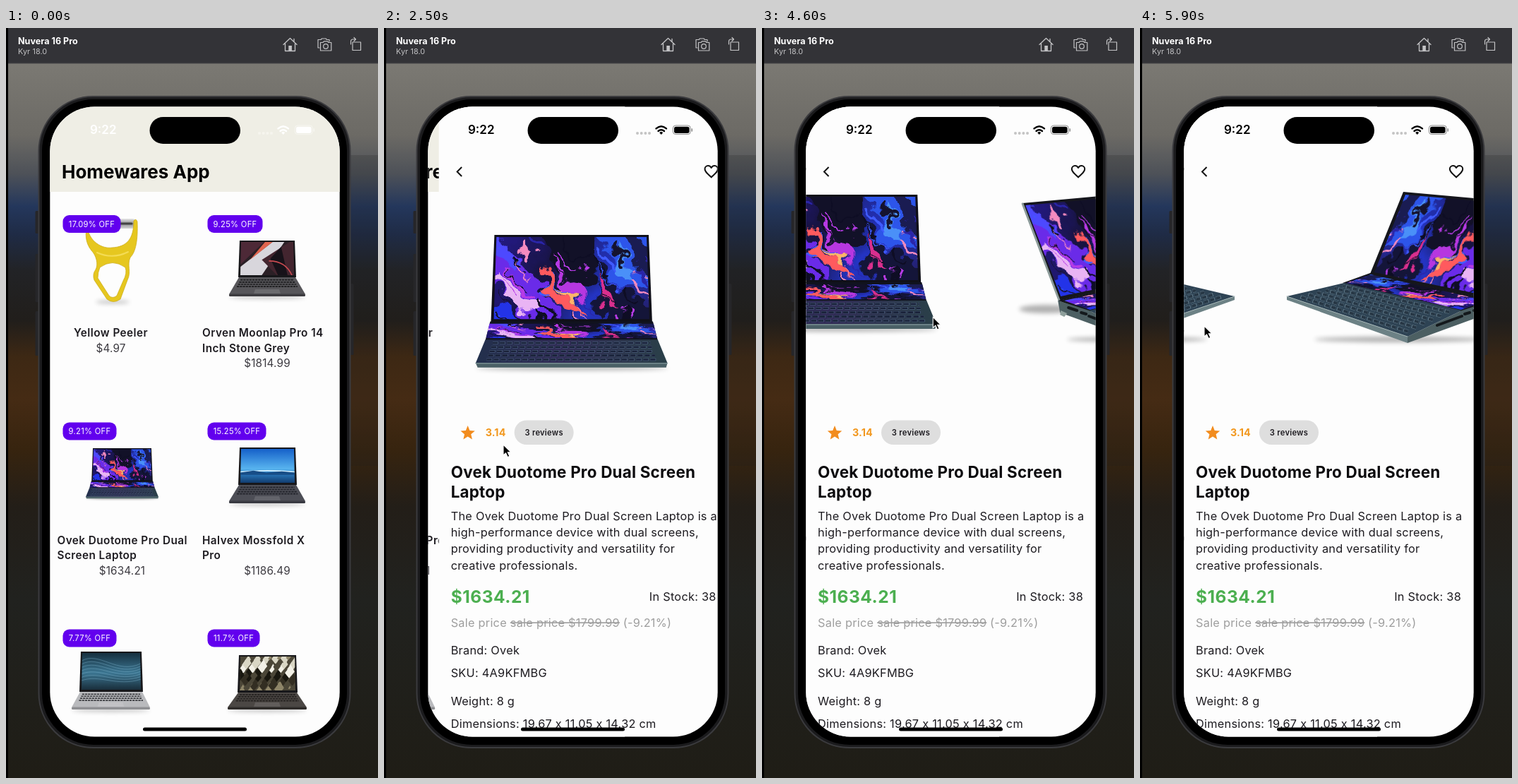
Animation of 527 by 1062 pixels, one loop 6000 ms. Source, as an HTML page:

```html
<!DOCTYPE html>
<html lang="en">
<head>
<meta charset="utf-8">
<title>Shop demo</title>
<style>
html, body { margin: 0; width: 100%; height: 100%; overflow: hidden; background: #000; }
svg { display: block; width: 527px; height: 1062px; }
text { font-family: Inter, Roboto, sans-serif; white-space: pre; }
</style>
</head>
<body>
<svg id="stage" viewBox="0 0 527 1062"></svg>
<script>
const LOOP = 6000, STEP = 100;
const INK = '#1d1b20', PAPER = '#fdfdfd';
let clipCount = 0;

// ---- markup helpers ----
const text = (x, y, str, size, { w = 400, fill = INK, ls = 0, anchor = 'start' } = {}) =>
  `<text x="${x}" y="${y}" font-size="${size}" font-weight="${w}" fill="${fill}" letter-spacing="${ls}" text-anchor="${anchor}">${str}</text>`;
const rect = (x, y, w, h, r, fill, extra = '') =>
  `<rect x="${x}" y="${y}" width="${w}" height="${h}" rx="${r}" fill="${fill}" ${extra}/>`;
const poly = (points, fill, extra = '') => `<polygon points="${points}" fill="${fill}" ${extra}/>`;
const line = (d, color, width, extra = '') =>
  `<path d="${d}" fill="none" stroke="${color}" stroke-width="${width}" stroke-linecap="round" stroke-linejoin="round" ${extra}/>`;
const shade = (cx, cy, rx, ry) => `<ellipse cx="${cx}" cy="${cy}" rx="${rx}" ry="${ry}" fill="#000" opacity=".3" filter="url(#soft)"/>`;
const gradient = (id, stops, dir = 'x2="0" y2="1"') => `<linearGradient id="${id}" ${dir}>` +
  stops.map(([at, color]) => `<stop offset="${at}" stop-color="${color}"/>`).join('') + '</linearGradient>';

// Places a 100 x 56 wallpaper on a screen polygon.
function screen(points, matrix, art) {
  const id = 'clip' + clipCount++;
  return `<clipPath id="${id}"><polygon points="${points}"/></clipPath>
    <g clip-path="url(#${id})"><g transform="matrix(${matrix})">${art}</g></g>`;
}

// Dashed rows between the back edge a-b and the front edge d-c of a deck.
function keys([a, b, c, d], rows, color, width, dash, from = .12, to = .88) {
  const mix = (p, q, k) => p.map((v, i) => v + (q[i] - v) * k);
  let out = '';
  for (let i = 0; i < rows; i++) {
    const k = from + (to - from) * i / (rows - 1);
    const l = mix(a, d, k), r = mix(b, c, k);
    out += `<path d="M${mix(l, r, .05)}L${mix(l, r, .95)}" stroke="${color}" stroke-width="${width}" stroke-dasharray="${dash}"/>`;
  }
  return out;
}

// ---- wallpapers ----
const blobs = [
  ['M18,-8C40,2 30,22 46,30S70,20 62,-8Z', '#121128'],
  ['M-8,8C10,4 22,18 30,32S44,44 40,66L20,66C26,48 10,40 -8,34Z', '#6a2be8'],
  ['M-6,24C8,26 12,36 22,40S32,46 31,50C22,50 12,46 6,40Z', '#e9b4f4'],
  ['M2,-4C12,4 8,12 20,18L14,24C6,18 2,10 -6,8Z', '#4d49ff'],
  ['M62,-6C66,8 82,10 76,24S92,36 108,30L108,-6Z', '#2d55ea'],
  ['M66,18C76,22 70,34 84,38S98,50 106,48L106,62L70,62C76,48 62,40 66,18Z', '#141539'],
  ['M84,-6C82,8 96,12 92,24L108,30L108,10Z', '#1a1c52'],
  ['M76,2C80,14 92,12 90,24S80,26 79,18Z', '#4a90f8'],
  ['M32,20C38,30 36,36 46,41S56,50 66,52C54,56 46,50 40,44S30,32 32,20Z', '#ff5a5e'],
  ['M38,12C46,18 44,28 54,31S58,42 64,44C52,44 46,38 42,30Z', '#b637e0'],
  ['M36,27C40,34 48,34 52,44C46,42 38,36 36,27Z', '#ffb46a'],
  ['M66,22C72,30 70,38 78,46C68,42 63,34 66,22Z', '#d92f8e'],
  ['M-6,46C8,46 16,52 30,60L-6,62Z', '#2333e8']
].map(([d, fill]) => `<path d="${d}" fill="${fill}"/>`).join('');
const inks = ['#0e0d24', '#3f5bff', '#15132f', '#b63be6', '#0e0d24', '#f58bc0', '#2a25a8'];
const streaks = Array.from({ length: 42 }, (_, i) => {
  const x = (i * 41) % 108 - 6, y = (i * 29) % 60 - 4, run = 5 + (i * 7) % 11;
  return line(`M${x},${y}q${run * .2},${run * .8} ${run},${run}`, inks[i % inks.length], .7 + (i % 4) * .6);
}).join('');
const fluid = `<g filter="url(#marble)">${rect(-20, -20, 150, 100, 0, 'url(#fluid)')}${blobs}${streaks}</g>`;

const shards = rect(0, 0, 100, 60, 0, '#2b2026') +
  poly('0,56 0,42 60,0 82,0 40,56', '#d8d6dc') + poly('0,0 44,0 0,38', '#4d2937') +
  poly('46,0 60,0 18,30', '#e0644e') + poly('68,56 40,30 92,0 100,0 100,56', '#43252f') +
  poly('56,28 76,8 88,56 70,56', '#171219') + line('M54,32Q84,32 96,56', '#c84a50', 2);
const horizon = rect(0, 0, 100, 60, 0, 'url(#sky)') +
  line('M0,38Q50,34 100,38', '#d8f2ff', 2) + poly('0,39 24,36 48,39 76,37 100,39 100,43 0,43', '#174d87');
let waves = rect(0, 0, 100, 60, 0, 'url(#teal)');
for (let i = 0; i < 7; i++) waves += line(`M0,${12 + i * 5}C30,${-4 + i * 6} 60,${34 + i * 3} 100,${16 + i * 4}`, '#83b9d2', .9, 'opacity=".5"');
let crystals = rect(0, 0, 100, 60, 0, '#4b4637');
for (let i = 0; i < 70; i++) {
  const x = (i * 37) % 101, y = (i * 23) % 57, s = 3 + (i * 7) % 9;
  crystals += poly(`${x},${y - s} ${x + s * .6},${y} ${x - s * .3},${y + s} ${x - s},${y + 2}`,
    ['#d9d6c4', '#19170f', '#8e8568', '#f2f0e6', '#332e22'][i % 5]);
}

// ---- products ----
function laptop({ x, y, w, hinge, left, right, front, art, deck, edge, key }) {
  const r = x + w, mid = (left + right) / 2, corners = [[x - 1, hinge], [r + 1, hinge], [right, front], [left, front]];
  return shade(mid, front + 4, (right - left) / 2, 2) +
    poly(`${x},${y} ${r},${y} ${r + 2},${hinge} ${x - 2},${hinge}`, '#17171a') +
    screen(`${x + 2},${y + 2} ${r - 2},${y + 2} ${r - 1},${hinge - 3} ${x + 1},${hinge - 3}`,
      [(w - 2) / 100, 0, 0, (hinge - y - 5) / 56, x + 1, y + 2], art) +
    poly(corners.join(' '), deck) + keys(corners, 4, key, 1.7, '3.2 1', .15, .55) +
    poly(`${mid - 17},${front - 7} ${mid + 17},${front - 7} ${mid + 19},${front - 1} ${mid - 19},${front - 1}`, '#fff', 'opacity=".12"') +
    rect(left, front - .5, right - left, 3.5, 1.5, edge);
}

const peeler = shade(151, 388, 24, 2) + rect(154, 270, 29, 14, 4, 'url(#steel)') +
  line('M160,277H178', '#444', 3) +
  `<path fill="#e6c71f" stroke="#c9a813" stroke-width=".7" fill-rule="evenodd" d="M115,280C117,303 137,313 150,311
   C171,310 181,299 181,273Q184,269 186,274C187,300 184,317 176,325C171,336 178,345 172,357L162,384Q152,391 143,384
   L125,357Q122,349 127,342C131,335 128,322 121,315C112,304 112,290 115,280Z
   M133,339Q151,326 169,339Q172,347 166,358L157,379Q151,384 146,379L130,354Q130,346 133,339Z"/>` +
  line('M129,318Q151,328 173,317', '#f4dc55', 2);

const dualFront = (() => {
  const deck = [[144, 386], [391, 386], [405, 420], [130, 420]];
  return shade(268, 427, 138, 3) +
    poly('157,236 378,236 383,361 152,361', '#101018') +
    screen('160,239 375,239 379,357 156,357', [2.23, 0, 0, 2.11, 156, 239], fluid) +
    poly('151,360 384,360 391,387 144,387', '#11131f') +
    screen('150,363 385,363 390,384 145,384', [2.47, 0, 0, .6, 144, 355], fluid) +
    poly(deck.join(' '), 'url(#dualDeck)') + keys(deck, 5, '#53698a', 3.4, '8 2.2', .14, .84) +
    keys(deck, 5, '#1a2239', 2.6, '7.4 2.8', .14, .84) +
    poly('130,419 405,419 403,426 133,426', '#4a6066') + line('M130,420H405', '#8ea3a6', 1);
})();

const dualSide = (() => {
  const deck = [[211, 400], [378, 361], [459, 380], [288, 437]];
  return shade(300, 441, 120, 4) + shade(150, 398, 38, 6) +
    poly('117,248 294,232 341,348 169,386', '#15161c') + line('M117,249L169,386', '#8b9a99', 3) +
    screen('121,251 291,236 335,346 171,380', [1.71, -.2, .86, 2.25, 121, 250], fluid) +
    poly('167,386 341,347 380,361 211,402', '#15161c') +
    screen('176,386 340,349 375,361 212,399', [1.7, -.36, .7, .32, 170, 383], fluid) +
    poly('167,386 211,400 288,437 288,446 170,403', '#4c5f62') +
    poly('288,437 459,380 459,385 288,446', '#6c8185') +
    poly(deck.join(' '), '#2e4354') + keys(deck, 6, '#637b8a', 5, '7 2') + keys(deck, 6, '#273745', 4, '6 3') +
    line('M182,396L194,400M200,403L207,405M211,408L246,421', '#14191c', 4) +
    poly('171,400 180,404 176,409 170,406', '#8fa09c') + line('M288,437L459,380', '#a5b5b5', 1);
})();

const products = peeler +
  laptop({ x: 331, y: 301, w: 78, hinge: 353, left: 316, right: 424, front: 377, art: shards, deck: '#57565a', edge: '#3d3c40', key: '#1c1c1e' }) +
  laptop({ x: 331, y: 594, w: 79, hinge: 647, left: 316, right: 424, front: 670, art: horizon, deck: '#4d4e56', edge: '#383941', key: '#22232a' }) +
  laptop({ x: 106, y: 883, w: 86, hinge: 940, left: 93, right: 204, front: 962, art: waves, deck: '#b9babd', edge: '#8f9093', key: '#3b3c40' }) +
  laptop({ x: 330, y: 888, w: 81, hinge: 941, left: 314, right: 426, front: 962, art: crystals, deck: '#4b4744', edge: '#2f2c2a', key: '#24211f' });

// ---- pages ----
const badge = (x, y, w, label) => rect(x, y, w, 25, 9, '#6200ee') +
  text(x + w / 2, y + 16.7, label, 11.2, { fill: '#fff', ls: .3, anchor: 'middle' });
const name = (x, y, str) => text(x, y, str, 15.3, { w: 600, ls: .45 });
const cost = (x, y, str) => text(x, y, str, 15.3, { fill: '#3c3a40', ls: .15, anchor: 'middle' });

const listPage = rect(62, 111, 411, 894, 0, PAPER) + rect(62, 111, 411, 121, 0, '#efeee5') +
  text(79, 213, 'Homewares App', 26, { w: 700, fill: '#000' }) + products +
  badge(80.5, 265, 82, '17.09% OFF') + badge(285.5, 265, 78, '9.25% OFF') +
  badge(80.5, 558.5, 76, '9.21% OFF') + badge(285.5, 558.5, 83, '15.25% OFF') +
  badge(80.5, 851.5, 76, '7.77% OFF') + badge(285.5, 851.5, 74, '11.7% OFF') +
  name(96, 437, 'Yellow Peeler') + cost(148.5, 458.5, '$4.97') +
  name(278, 437, 'Orven Moonlap Pro 14') + name(278, 458.5, 'Inch Stone Grey') + cost(370, 480, '$1814.99') +
  name(72.5, 730.5, 'Ovek Duotome Pro Dual') + name(72.5, 752, 'Screen Laptop') + cost(164.5, 773.5, '$1634.21') +
  name(278, 730.5, 'Halvex Mossfold X') + name(278, 752, 'Pro') + cost(370, 773.5, '$1186.49');

const body = (x, y, str, fill = INK, anchor) => text(x, y, str, 16.32, { fill, ls: .255, anchor });
const star = Array.from({ length: 10 }, (_, i) => {
  const a = Math.PI * (i / 5 - .5), r = i % 2 ? 4.8 : 10.7;
  return [103 + r * Math.cos(a), 573.8 + r * Math.sin(a)].map(v => v.toFixed(1));
}).join(' ');

const detailPage = rect(62, 111, 411, 894, 0, PAPER) +
  `<path d="M94.5,197L88,203.5L94.5,210" fill="none" stroke="#111" stroke-width="2"/>` +
  line('M12,20C6,14.5 3,12 3,8.5C3,6 5,4 7.5,4C9.3,4 11,5.1 12,6.8C13,5.1 14.7,4 16.5,4C19,4 21,6 21,8.5C21,12 18,14.5 12,20Z',
    '#111', 2, 'transform="translate(435.8 191) scale(1.02)"') +
  poly(star, '#f28c1e') + text(128, 578, '3.14', 14.3, { w: 700, fill: '#f2981f', ls: .15 }) +
  rect(169, 555.5, 84, 34.5, 17.2, '#dedede') + text(211, 577, '3 reviews', 11.2, { w: 600, ls: .25, anchor: 'middle' }) +
  ['Ovek Duotome Pro Dual Screen', 'Laptop'].map((s, i) => text(79, 636.5 + i * 28.5, s, 22.44, { w: 700, fill: '#0c0b0e', ls: .2 })).join('') +
  ['The Ovek Duotome Pro Dual Screen Laptop is a', 'high-performance device with dual screens,',
    'providing productivity and versatility for', 'creative professionals.'].map((s, i) => body(79, 696.5 + i * 23.4, s)).join('') +
  text(79, 814, '$1634.21', 24.5, { w: 700, fill: '#4caf50', ls: .5 }) + body(455, 811, 'In Stock: 38', INK, 'end') +
  body(79, 847.5, 'Sale price <tspan text-decoration="line-through">sale price $1799.99</tspan> (-9.21%)', '#9e9e9e') +
  [[887, 'Brand: Ovek'], [918.8, 'SKU: 4A9KFMBG'], [958.8, 'Weight: 8 g'], [990.5, 'Dimensions: 19.67 x 11.05 x 14.32 cm']]
    .map(([y, s]) => body(79, y, s)).join('');

const signal = [359, 364.7, 370.4, 376].map(x => `<circle cx="${x}" cy="149" r="2"/>`).join('');
const statusBar = (id, color, dotColor) => `<g id="${id}">` +
  text(119, 150.3, '9:22', 17, { w: 600, fill: color }) + `<g fill="${dotColor}">${signal}</g>` +
  line('M385.5,142.4Q392.7,136 400,142.4M388.5,146Q392.7,142.4 397,146', color, 2.4) +
  `<path d="M390.2,148.2Q392.7,146 395.2,148.2L392.7,151Z" fill="${color}"/>` +
  rect(409.3, 138, 25, 12.6, 4, 'none', `stroke="${color}" stroke-opacity=".45"`) + rect(411, 139.7, 21.6, 9.2, 2.7, color) +
  line('M436.3,142.8V146', color, 1.3, 'opacity=".5"') + '</g>';

// ---- simulator window ----
const toolbar = rect(3, 0, 524, 50, 0, '#333337') + rect(3, 49.5, 524, 1, 0, '#48484a') +
  text(17, 22.7, 'Nuvera 16 Pro', 12.6, { w: 700, fill: '#fff' }) + text(17, 36.7, 'Kyr 18.0', 10.8, { fill: '#c2c2c4', ls: .1 }) +
  line('M393,23.5L402.5,14.5L412,23.5M395.5,22V32.5H409.5V22M408,19V15.5', '#c4c4c6', 1.3) + rect(400.3, 25, 4.6, 7.5, 0, '#c4c4c6') +
  line('M444,28H442V16.5H446L447.5,15H453L454.5,16.5H458V19M445.5,20.5H449L450.5,18.8H455.5L457,20.5H460.8V32H445.5Z', '#c4c4c6', 1.2) +
  `<circle cx="453" cy="26" r="3.3" fill="none" stroke="#c4c4c6" stroke-width="1.2"/>` +
  line('M491,20H502.5V31.5H491ZM488.5,23V19Q488.5,16 491.5,16H495M493,13.5L495.5,16L493,18.5', '#c4c4c6', 1.2);

const phone = [[259, 32], [320, 68], [401, 63]].map(([y, h]) => rect(41.5, y, 6, h, 1.5, '#262629')).join('') +
  rect(486, 362, 6.5, 101, 1.5, '#262629') +
  rect(46.5, 97, 441, 922, 77, '#1b1b1d', 'stroke="#3b3b3e" stroke-width="2"') + rect(51, 101, 432, 914, 73, '#000');

document.getElementById('stage').innerHTML = `
  <defs>
    <filter id="soft" x="-30%" y="-300%" width="160%" height="700%"><feGaussianBlur stdDeviation="3"/></filter>
    <filter id="marble" color-interpolation-filters="sRGB">
      <feTurbulence type="fractalNoise" baseFrequency=".07" numOctaves="3" seed="4"/>
      <feDisplacementMap in="SourceGraphic" scale="20" xChannelSelector="R" yChannelSelector="G"/>
    </filter>
    <clipPath id="display"><rect x="62.3" y="111.5" width="410.4" height="892" rx="63"/></clipPath>
    ${gradient('desk', [[0, '#7b7973'], [.1, '#6c6a65'], [.155, '#4d5158'], [.2, '#24375c'], [.24, '#1f2b45'], [.29, '#222326'],
      [.36, '#211e1b'], [.41, '#3d2814'], [.47, '#452b14'], [.54, '#37240f'], [.62, '#231e18'], [.75, '#21221f'], [1, '#1f1d16']])}
    ${gradient('fluid', [[0, '#3020c4'], [.45, '#17133f'], [.7, '#2434c4'], [1, '#231c5e']], 'x2="1" y2=".3"')}
    ${gradient('sky', [[0, '#1560c9'], [.55, '#58b4ef'], [.68, '#2a79bd'], [1, '#0b2c5a']])}
    ${gradient('teal', [[0, '#16303f'], [.5, '#3c7692'], [1, '#14232e']])}
    ${gradient('steel', [[0, '#e8e8e8'], [.5, '#8d8d90'], [1, '#d6d6d6']])}
    ${gradient('dualDeck', [[0, '#22304c'], [.45, '#302a55'], [1, '#2a4048']], 'x2="1" y2="0"')}
  </defs>
  ${rect(0, 0, 527, 1062, 0, '#000')}${rect(3, 50, 524, 1012, 0, 'url(#desk)')}
  ${rect(300, 180, 227, 440, 0, '#1e1f22', 'opacity=".2"')}
  ${toolbar}${phone}
  <g clip-path="url(#display)">
    <g id="list">${listPage}</g>
    <g id="detail">${detailPage}</g>
    <g id="hero">${dualFront}</g>
    <g id="gallery"><g transform="translate(410 0)">${dualSide}</g><g transform="translate(1402 0) scale(-1 1)">${dualSide}</g></g>
    ${statusBar('lightStatus', '#fff', '#f6f5ee')}${statusBar('darkStatus', '#000', '#c4c4c4')}
    ${rect(203.5, 126, 128.5, 38, 19, '#000')}${rect(194, 990.5, 147, 5, 2.5, '#000')}
  </g>
  <path id="cursor" d="M0,0V15L3.6,11.8L6.2,17.6L8.8,16.4L6.3,10.8H11Z" fill="#000" stroke="#fff" stroke-width="1.1"/>`;

// ---- motion ----
const PUSH = { start: 2300, length: 345 };
const pointer = [[1700, 540, 640], [2200, 169, 590], [3500, 169, 590], [4000, 178, 586], [4400, 400, 405],
  [4700, 187, 411], [5000, 187, 411], [5450, 416, 418], [5900, 91, 422]];
const swipe = [[4400, 0], [4700, -213], [4950, -410], [5450, -410], [5900, -735]];

const clamp = v => Math.min(1, Math.max(0, v));
const easeOut = (v, power) => 1 - (1 - v) ** power;
function follow(track, t) {
  const i = Math.max(0, track.findLastIndex(step => step[0] <= t));
  const a = track[i], b = track[i + 1] || a;
  const k = a === b ? 0 : clamp((t - a[0]) / (b[0] - a[0])), e = k * k * (3 - 2 * k);
  return a.slice(1).map((v, j) => v + (b[j + 1] - v) * e);
}

const part = id => document.getElementById(id);
const move = (id, value) => part(id).setAttribute('transform', value);
const show = (id, on) => part(id).setAttribute('visibility', on ? 'visible' : 'hidden');

function draw(t) {
  const k = clamp((t - PUSH.start) / PUSH.length), page = easeOut(k, 3.77);
  move('list', `translate(${-137 * page} 0)`);
  move('detail', `translate(${411 * (1 - page)} 0)`);
  show('detail', k > 0);

  // The shared picture flies on an arc, fast sideways and then upwards.
  const angle = easeOut(k, 2.45) * Math.PI / 2, across = Math.sin(angle), up = 1 - Math.cos(angle);
  const [scroll] = follow(swipe, t);
  move('hero', `translate(${164.5 + 103 * across + scroll} ${631 - 299 * up}) scale(${.375 + .625 * across}) translate(-267.5 -332)`);
  move('gallery', `translate(${scroll} 0)`);

  show('lightStatus', page <= .5);
  show('darkStatus', page > .5);
  move('cursor', `translate(${follow(pointer, t)})`);
  show('cursor', t >= pointer[0][0]);
}

const began = performance.now();
function tick() {
  const t = (performance.now() - began) % LOOP;
  draw(Math.floor(t / STEP) * STEP);
  requestAnimationFrame(tick);
}
tick();
</script>
</body>
</html>
```
